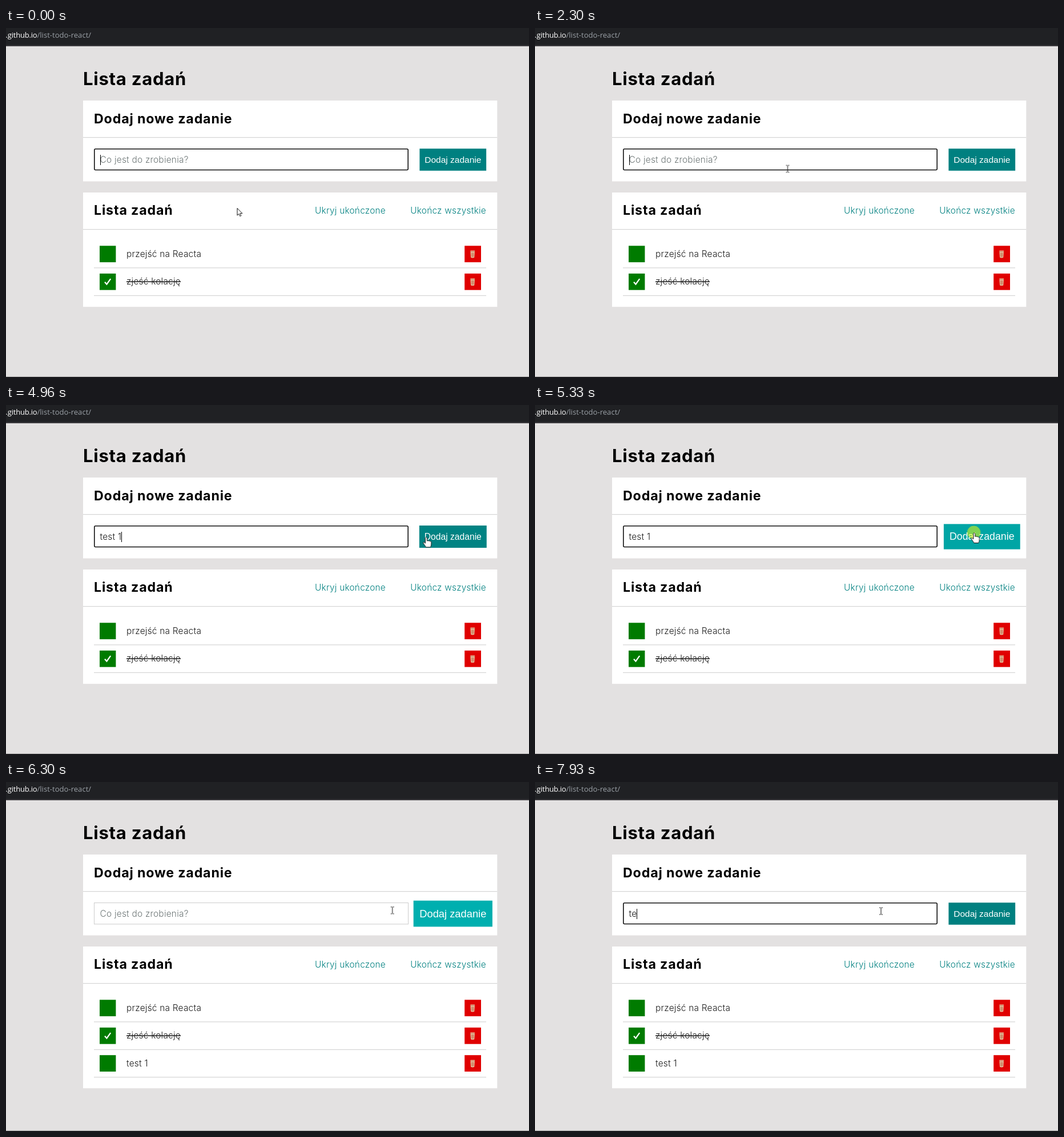
An HTML page for the animation above (8 s loop, 916 px wide and 611 px high).

```html
<!DOCTYPE html>
<html lang="pl">
<head>
<meta charset="utf-8">
<title>Lista zadań</title>
<style>
  html, body { margin: 0; width: 100%; height: 100%; overflow: hidden; background: #e3e1e1; }
  svg { display: block; width: 916px; height: 611px; }
  text { font: 350 15.4px Inter, sans-serif; letter-spacing: .24px; fill: #1c1c1c; white-space: pre; }
  .title { font-weight: 700; font-size: 31px; letter-spacing: .75px; fill: #000; }
  .subtitle { font-weight: 700; font-size: 23.2px; letter-spacing: .85px; fill: #000; }
  .url { font: 13.1px "Open Sans", sans-serif; letter-spacing: 0; fill: #9aa0a6; }
  .host { letter-spacing: -.25px; fill: #fff; text-anchor: end; }
  .link { fill: #008080; }
  .done { text-decoration: line-through; }
  .rule { fill: #d5d5d5; }
  #button text { font: 15.5px "Liberation Sans", Arial, sans-serif; letter-spacing: 0; fill: #fff; text-anchor: middle; }
  #cursor path { stroke-linejoin: round; }
</style>
</head>
<body>
<svg viewBox="0 0 916 611">
  <defs>
    <g id="bin">
      <rect width="28.8" height="28.8" fill="#e00000"/>
      <path d="M10.2 8.5h7.6l-.8 12q-3 1.4-6 0z" fill="#eccfaa"/>
      <path d="M10.4 10.2h7.2M12.4 12v7.5M14 12v8M15.6 12v7.5" stroke="#b5482f" stroke-width=".8"/>
    </g>
  </defs>

  <rect width="916" height="611" fill="#e3e1e1"/>
  <rect width="916" height="31" fill="#202124"/>
  <rect y="30" width="916" height="2" fill="#3b3a3e"/>
  <rect y="610" width="916" height="1" fill="#a9a8a8"/>
  <text class="url host" x="54.5" y="17">.github.io</text>
  <text class="url" x="54.5" y="17">/list-todo-react/</text>

  <text class="title" x="135" y="100">Lista zadań</text>

  <rect x="135" y="127" width="725.3" height="141.5" fill="#fff"/>
  <rect class="rule" x="135" y="191" width="725.3" height="1.2"/>
  <text class="subtitle" x="154" y="167">Dodaj nowe zadanie</text>
  <rect id="field"/>
  <text id="value" x="164.5" y="235.7"></text>
  <rect id="caret" y="222" width="1" height="18"/>
  <g id="button">
    <rect x="-58.4" y="-19.3" width="116.8" height="38.6"/>
    <text y="5.1">Dodaj zadanie</text>
  </g>

  <rect id="list" x="135" y="288" width="725.3" fill="#fff"/>
  <rect class="rule" x="135" y="352" width="725.3" height="1.2"/>
  <text class="subtitle" x="154" y="327">Lista zadań</text>
  <text class="link" x="541" y="325">Ukryj ukończone</text>
  <text class="link" x="841" y="325" text-anchor="end">Ukończ wszystkie</text>
  <g id="tasks"></g>

  <g id="cursor">
    <circle id="press" cx="-.7" cy="-.8" r="11.7" fill="#ff0" fill-opacity=".5"/>
    <path id="arrow" d="M.5.5V13L3.4 10.4 5.3 14.6 7.3 13.7 5.5 9.6H9.3Z" fill="#fff" stroke="#111"/>
    <path id="beam" d="M-3-6H-.6M.6-6H3M0-5.6V5.6M-3 6H-.6M.6 6H3" fill="none" stroke="#222" stroke-width="1.1"/>
    <path id="hand" fill="#fff" stroke="#111" d="M-1.5 1.5c0-2 3-2 3 0v5c.5-1 2.5-1 2.7.2.8-.8 2.4-.4 2.6.6 1-.5 2.2 0 2.2 1.3V12c0 3-1 4-1.5 5.5h-8C-1.5 15-4 12.5-5 10.5c-.6-1.5 1-2.3 2-1.3l1.5 1.5Z"/>
  </g>
</svg>

<script>
const LOOP = 8000;
const $ = id => document.getElementById(id);
const show = (el, on) => el.setAttribute('visibility', on ? 'visible' : 'hidden');
const setAttrs = (el, attrs) => Object.entries(attrs).forEach(([k, v]) => el.setAttribute(k, v));

// Each table lists [start time, state].
const values = [[0, ''], [2340, 't'], [2530, 'te'], [2740, 'tes'], [3050, 'test'], [3290, 'test '],
  [3580, 'test 1'], [5430, ''], [7780, 't'], [7930, 'te']];
const carets = [[0, 1], [710, 0], [1240, 1], [1770, 0], [2300, 1], [4100, 0], [4630, 1], [5160, 0],
  [6650, 1], [7300, 0], [7780, 1]];
const focus = [[0, 1], [5370, 0], [6650, 1]];
const presses = [[0, 0], [5320, 1], [5430, 0], [6650, 1], [6770, 0]];
const shapes = [[0, 'arrow'], [740, 'beam'], [4865, 'arrow'], [4895, 'hand'], [6210, 'arrow'], [6225, 'beam']];
const added = [[0, 0], [5430, 1]];
const stateAt = (table, t) => table.findLast(([start]) => start <= t)[1];

const task = (label, y, done) => `
  <rect x="164" y="${y}" width="28.4" height="28.8" fill="#007b00"/>
  ${done ? `<path d="M173 ${y + 14.8}l3.4 4 6.8-9.6" fill="none" stroke="#fff" stroke-width="2.2"/>` : ''}
  <text x="211" y="${y + 19.3}" class="${done ? 'done' : ''}">${label}</text>
  <use href="#bin" x="803.2" y="${y}"/>
  <rect class="rule" x="154" y="${y + 38}" width="687" height="1.2"/>`;
$('tasks').innerHTML = task('przejść na Reacta', 381.3) + task('zjeść kolację', 429.9, true) +
  `<g id="newTask">${task('test 1', 478.2)}</g>`;

// Paused animations are seeked from the shared clock.
const timeline = (el, frames) => {
  const anim = el.animate(frames.map(([time, props, easing = 'linear']) =>
    ({ ...props, offset: time / LOOP, easing })), { duration: LOOP, fill: 'both' });
  anim.pause();
  return anim;
};
const at = (x, y, scale = 1) => ({ transform: `translate(${x}px, ${y}px) scale(${scale})` });
const rest = at(782.8, 230.5), grown = at(782.8, 230.5, 1.2);
const teal = { fill: '#008080' }, bright = { fill: '#00b3b3' };
const hover = (off, on) => [[0, off], [4895, off, 'ease'], [5895, on], [6210, on, 'ease'], [7210, off], [LOOP, off]];

const anims = [
  timeline($('button'), hover(rest, grown)),
  timeline($('button').firstElementChild, hover(teal, bright)),
  timeline($('cursor'), [
    [0, at(404.5, 315)], [260, at(404.5, 315), 'ease-in-out'], [1060, at(446, 228)],
    [1160, at(446, 228)], [1340, at(446, 234)], [1630, at(446, 234)], [1770, at(442.5, 246.5)],
    [4490, at(442.5, 246.5), 'ease-in'], [4895, at(724, 234), 'ease-out'], [5290, at(769.3, 224)],
    [5450, at(769.3, 224)], [5920, at(755.5, 222.5), 'ease-in'], [6210, at(713, 224), 'ease-out'],
    [6620, at(606, 226)], [LOOP, at(606, 226)]
  ])
];

function render(t) {
  anims.forEach(anim => anim.currentTime = t);

  const typed = stateAt(values, t), focused = stateAt(focus, t), value = $('value');
  const label = typed || 'Co jest do zrobienia?';
  if (value.textContent !== label) value.textContent = label;
  value.style.fill = typed ? '#1c1c1c' : '#6c7575';
  setAttrs($('caret'), { x: Math.round(165 + (typed ? value.getComputedTextLength() - 1 : 0)) });
  show($('caret'), stateAt(carets, t) && focused);

  const inset = focused ? .8 : .5;
  setAttrs($('field'), {
    x: 154 + inset, y: 211 + inset, width: 551 - 2 * inset, height: 38.3 - 2 * inset,
    rx: focused ? 2 : 0, fill: '#fff', stroke: focused ? '#101010' : '#ccc', 'stroke-width': 2 * inset
  });

  const grownList = stateAt(added, t);
  setAttrs($('list'), { height: grownList ? 248.2 : 200.2 });
  show($('newTask'), grownList);

  const shape = stateAt(shapes, t);
  ['arrow', 'beam', 'hand'].forEach(id => show($(id), id === shape));
  show($('press'), stateAt(presses, t));
}

const start = performance.now();
function tick() {
  render((performance.now() - start) % LOOP);
  requestAnimationFrame(tick);
}
tick();
</script>
</body>
</html>
```
